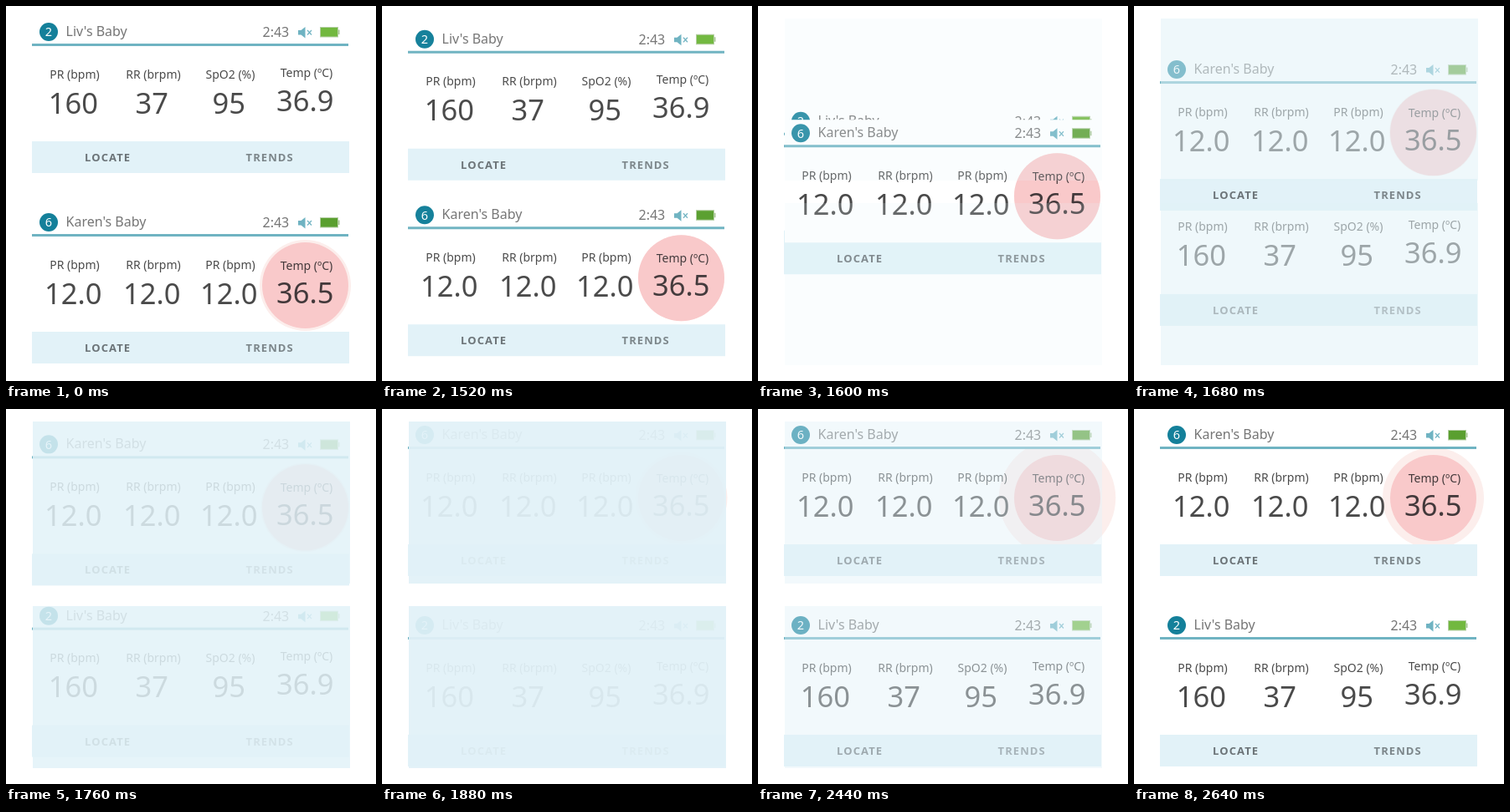
An HTML page for the animation above (3920 ms loop, 442x449 px).

```html
<!DOCTYPE html>
<html lang="en">
<head>
<meta charset="utf-8">
<title>Patient list reorder</title>
<style>
  html, body { margin: 0; width: 100%; height: 100%; overflow: hidden; background: #fff; }
  svg { display: block; width: 100%; height: 100%; font-family: "Noto Sans", "Open Sans", sans-serif; }
  .name, .time { font-size: 16px; fill: #757575; }
  .badge { font-size: 14.5px; font-weight: 500; fill: #fff; text-anchor: middle; }
  .label { font-size: 14px; font-weight: 500; fill: #4a4a4a; text-anchor: middle; }
  .value { font-size: 34.5px; fill: #4a4a4a; text-anchor: middle; }
  .alert .label, .alert .value { fill: #43393b; }
  .action { font-size: 13px; font-weight: 600; letter-spacing: 1.1px; fill: #6b7377; }
  .action.soft { fill: #7c868a; }
</style>
</head>
<body>
<svg id="stage" viewBox="0 0 442 449"></svg>
<script>
const LOOP = 3920, STEP = 40, SLOT = 228;
const TINT = '#e2f2f8', TEAL = '#6fb3c2';

const vital = (x, label, value, labelY = 86.5, valueY = 128.5, cls = '') => `
  <g class="${cls}">
    <text class="label" x="${x}" y="${labelY}">${label}</text>
    <text class="value" x="${x - 1.7}" y="${valueY}">${value}</text>
  </g>`;

const card = (id, number, name, green, vitals, alert = '') => `
  <g id="${id}">
    <rect x="32" y="15" width="379" height="194" fill="#fff"/>
    ${alert}
    <circle cx="51" cy="31" r="11" fill="#14809a"/>
    <text class="badge" x="51" y="36.3">${number}</text>
    <text class="name" x="71.5" y="36">${name}</text>
    <text class="time" x="306.5" y="37">2:43</text>
    <path d="M349 29h3.5l5-4v13.500l-5-4h-3.500z" fill="${TEAL}"/>
    <path d="M360 29l5 5.500m0-5.500l-5 5.500" stroke="${TEAL}" stroke-width="1.2"/>
    <rect x="375.500" y="25.500" width="21" height="11.500" fill="${green}" stroke="#b5cfa5"/>
    <rect x="397" y="28.500" width="1.500" height="5.500" fill="#a9c795"/>
    <rect x="31" y="45" width="378" height="3" fill="${TEAL}"/>
    ${vitals}
    <rect x="31" y="162" width="379" height="38" fill="${TINT}"/>
    <text class="action" x="94" y="186">LOCATE</text>
    <text class="action soft" x="286.500" y="186">TRENDS</text>
  </g>`;

const cover = y => `<rect class="cover" x="32" y="${y}" width="379" height="194" fill="${TINT}"/>`;

const stage = document.getElementById('stage');
stage.innerHTML = `
  <clipPath id="vitalsArea"><rect y="48" width="442" height="114"/></clipPath>` +
  card('calm', 2, "Liv's Baby", '#72b83f',
    vital(82, 'PR (bpm)', '160') + vital(176, 'RR (brpm)', '37') +
    vital(268, 'SpO2 (%)', '95') + vital(359, 'Temp (ºC)', '36.9', 84.5, 125.5)) +
  card('urgent', 6, "Karen's Baby", '#5a9f2f',
    vital(82, 'PR (bpm)', '12.0') + vital(176, 'RR (brpm)', '12.0') +
    vital(268, 'PR (bpm)', '12.0') + vital(359, 'Temp (ºC)', '36.5', 87.5, 128, 'alert'),
    `<g clip-path="url(#vitalsArea)">
      <circle id="ring" cx="357.500" cy="106.500" fill="#fceeec"/>
      <circle cx="357.500" cy="106.500" r="51.500" fill="#f9c9ca"/>
    </g>`) +
  cover(15) + cover(236);

const calm = document.getElementById('calm');
const urgent = document.getElementById('urgent');
const ring = document.getElementById('ring');
const covers = stage.querySelectorAll('.cover');

const progress = (t, start, duration) => Math.min(1, Math.max(0, (t - start) / duration));

// CSS-style cubic Bézier easing, solved by bisection.
function bezier(x1, y1, x2, y2) {
  const at = (a, b, u) => 3 * a * u * (1 - u) ** 2 + 3 * b * u * u * (1 - u) + u ** 3;
  return x => {
    if (x <= 0 || x >= 1) return x;
    let lo = 0, hi = 1;
    for (let i = 0; i < 24; i++) {
      const mid = (lo + hi) / 2;
      if (at(x1, x2, mid) < x) lo = mid; else hi = mid;
    }
    return at(y1, y2, lo);
  };
}
const ease = bezier(.25, .1, .25, 1);
const easeInOut = bezier(.42, 0, .58, 1);
const easeOut = bezier(0, 0, .58, 1);

function ringRadius(t) {
  if (t < 1520) return 54.5;
  if (t < 2360) return 51.5 + 3.5 * progress(t, 1520, 360) ** 2;
  return 73.5 - 13 * progress(t, 2360, 280);
}

function draw(now) {
  const t = Math.floor(now % LOOP / STEP) * STEP;
  const shift = SLOT * ease(progress(t, 1500, 360));
  calm.setAttribute('transform', `translate(0 ${shift})`);
  urgent.setAttribute('transform', `translate(0 ${SLOT - shift})`);
  ring.setAttribute('r', ringRadius(t));
  const fade = easeInOut(progress(t, 1500, 330)) - easeOut(progress(t, 2320, 320));
  covers.forEach(c => c.setAttribute('opacity', .94 * fade));
}

const begin = performance.now();
function tick() {
  draw(performance.now() - begin);
  requestAnimationFrame(tick);
}
tick();
</script>
</body>
</html>
```
